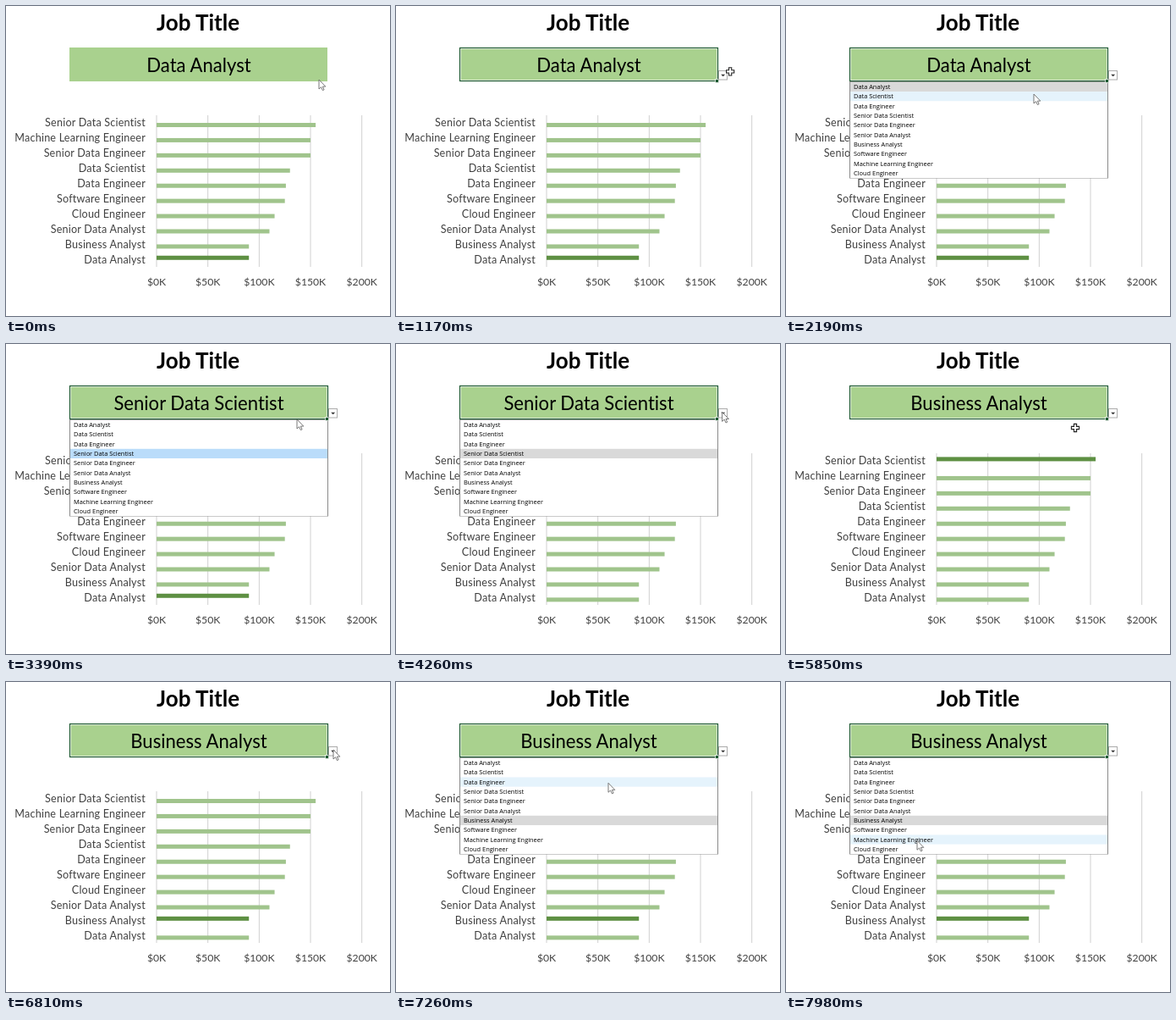
Recreate the animation shown at these times as an HTML page. Size 454 by 366 pixels, loop 8000 ms.

```html
<!DOCTYPE html>
<html lang="en">
<head>
<meta charset="utf-8">
<title>Salary by job title</title>
<style>
  html, body { margin: 0; width: 100%; height: 100%; overflow: hidden; background: #fff; }
  svg { display: block; width: 454px; height: 366px; font-family: Lato, "Open Sans", sans-serif; font-variant-ligatures: none; }
  .label { font-size: 12.6px; letter-spacing: .2px; fill: #404040; text-anchor: end; }
  .tick { font-size: 12.2px; fill: #404040; text-anchor: middle; }
  .item { font: 7.42px "Open Sans", sans-serif; }
</style>
</head>
<body>
<svg viewBox="0 0 454 366">
  <text x="227" y="29" font-size="26" font-weight="700" text-anchor="middle">Job Title</text>
  <rect x="75" y="49" width="305" height="40" fill="#a9d18e"/>
  <text id="title" x="228" y="78" font-size="22.1" text-anchor="middle"></text>
  <g id="chart"></g>
  <g id="list">
    <rect x="75.5" y="89.5" width="305" height="113.5" fill="#fff" stroke="#8a8a8a"/>
  </g>
  <g id="focus" fill="none">
    <rect x="76.5" y="50.5" width="303" height="37" stroke="#eef6e8"/>
    <rect x="75.5" y="49.5" width="305" height="39" stroke="#1f5a32" stroke-width="1.2"/>
    <rect x="377.5" y="86.5" width="4" height="4" fill="#1f5a32" stroke="#fff" stroke-width=".7"/>
    <rect x="381.5" y="76.5" width="10" height="10.5" fill="#fff" stroke="#ababab"/>
    <path d="M384.2 80.7h5l-2.5 2.6z" fill="#333"/>
  </g>
  <path id="arrow" d="M0 0V11L2.6 8.7L4.4 12.6L6.1 11.8L4.4 8.1H7.8Z" fill="#fff" stroke="#6a6a6a" stroke-width=".9"/>
  <path id="cross" d="M-1.6 -4.6H1.6V-1.6H4.6V1.6H1.6V4.6H-1.6V1.6H-4.6V-1.6H-1.6Z" fill="#fff" stroke="#222" stroke-width="1.1"/>
</svg>
<script>
const LOOP = 8000, ROW = 11.33, LIST_TOP = 89.8, BAR_STEP = 17.93, X0 = 178, PER_K = 1.2135;
const CLOSE_LAG = 300, CHART_LAG = 520;

const salaries = {
  'Senior Data Scientist': 155, 'Machine Learning Engineer': 150,
  'Senior Data Engineer': 150, 'Data Scientist': 130, 'Data Engineer': 126,
  'Software Engineer': 125, 'Cloud Engineer': 115, 'Senior Data Analyst': 110,
  'Business Analyst': 90, 'Data Analyst': 90
};
const options = [
  'Data Analyst', 'Data Scientist', 'Data Engineer', 'Senior Data Scientist',
  'Senior Data Engineer', 'Senior Data Analyst', 'Business Analyst',
  'Software Engineer', 'Machine Learning Engineer', 'Cloud Engineer'
];
const visits = [
  { open: 1400, pick: 3150, row: 3 },
  { open: 4140, pick: 5430, row: 6 },
  { open: 6840, pick: LOOP }
];

// Pointer moves: start, end, destination; it rests in between
const HOME = [370, 87], BUTTON = [387, 80];
const overRow = (row, x) => [x, LIST_TOP + (row + .6) * ROW];
const moves = [
  [30, 360, [338, 73]], [510, 800, [442, 62]], [800, 1290, BUTTON],
  [1500, 2190, [293, 104]], [2190, 2400, overRow(8, 272)], [2400, 2640, overRow(3, 262)],
  [3150, 3390, [344, 89]], [3390, 3900, BUTTON],
  [4230, 4890, overRow(4, 169)], [4890, 5400, overRow(6, 188)],
  [5480, 5850, [342, 99]], [5850, 6390, BUTTON],
  [6860, 7260, overRow(2, 251)], [7260, 7560, [288, 255]], [7560, 7980, overRow(8, 155)]
];

const $ = id => document.getElementById(id);
const show = (el, on) => el.setAttribute('display', on ? 'inline' : 'none');
const chosenAt = t => visits.reduce((row, v) => t >= v.pick ? v.row : row, 0);

function add(parent, tag, attrs, text = '') {
  const el = document.createElementNS('http://www.w3.org/2000/svg', tag);
  for (const k in attrs) el.setAttribute(k, attrs[k]);
  el.textContent = text;
  return parent.appendChild(el);
}

for (let k = 0; k <= 200; k += 50) {
  const x = X0 + k * PER_K;
  add($('chart'), 'path', { d: `M${x} 129V308`, stroke: '#d0d0d0' });
  add($('chart'), 'text', { x, y: 330, class: 'tick' }, `$${k}K`);
}
const bars = Object.entries(salaries).map(([name, k], i) => {
  add($('chart'), 'text', { x: 165, y: 142.2 + i * BAR_STEP, class: 'label' }, name);
  return { name, el: add($('chart'), 'rect', { x: X0, width: k * PER_K, height: 5 }) };
});
const rows = options.map((name, i) => {
  const y = LIST_TOP + i * ROW;
  const row = add($('list'), 'rect', { x: 76, y, width: 304, height: ROW });
  add($('list'), 'text', { x: 80, y: y + 8.3, class: 'item' }, name);
  return row;
});

function pointer(t) {
  return moves.reduce((pos, [start, end, goal]) => {
    const u = Math.min(1, Math.max(0, (t - start) / (end - start)));
    const e = u * u * (3 - 2 * u);
    return pos.map((p, i) => p + (goal[i] - p) * e);
  }, HOME);
}

function rowColor(i, chosen, hover) {
  if (i === chosen) return i === hover ? '#badcfa' : '#d9d9d9';
  return i === hover ? '#e5f3fc' : '#fff';
}

function draw(t) {
  const [x, y] = pointer(t);
  const chosen = chosenAt(t), marked = options[chosenAt(t - CHART_LAG)];
  const visit = visits.find(v => t >= v.open && t < v.pick + CLOSE_LAG);

  $('title').textContent = options[chosen];
  show($('focus'), t >= 530);
  show($('list'), visit);

  bars.forEach(({ name, el }, i) => {
    const on = name === marked;
    el.setAttribute('y', (on ? 133.4 : 138) + i * BAR_STEP);
    el.setAttribute('fill', on ? '#5e9043' : '#a0c48c');
  });

  let hover = -1;
  if (visit && t >= visit.pick) hover = chosen;
  else if (x < 380 && y > LIST_TOP) hover = Math.min(9, Math.floor((y - LIST_TOP) / ROW));
  rows.forEach((row, i) => row.setAttribute('fill', rowColor(i, chosen, hover)));

  const onButton = x > 380 && x < 393 && y > 75 && y < 88;
  const arrow = t < 100 || visit || onButton;
  show($('arrow'), arrow);
  show($('cross'), !arrow);
  $(arrow ? 'arrow' : 'cross').setAttribute('transform', `translate(${x} ${y})`);
}

function tick() {
  draw(performance.now() % LOOP);
  requestAnimationFrame(tick);
}
tick();
</script>
</body>
</html>
```
